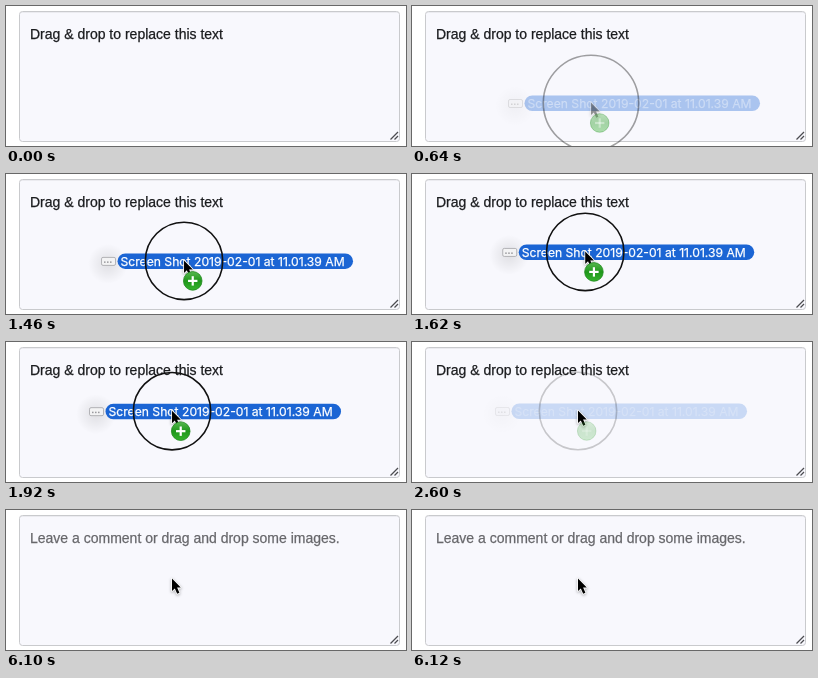
Recreate the animation shown at these times as an HTML page with a canvas. Size 400x140 px, loop 8 s.

```html
<!DOCTYPE html>
<html lang="en">
<head>
<meta charset="utf-8">
<title>Drag and drop</title>
<style>
html, body { margin: 0; width: 100%; height: 100%; overflow: hidden; background: #fff; }
canvas { display: block; width: 400px; height: 140px; }
</style>
</head>
<body>
<canvas id="stage"></canvas>
<script>
const LOOP = 8000, W = 400, H = 140;
const APPEAR = [500, 1220], MOVE = [1320, 1960], DROP = [2160, 2720], SWAP = 3310;
const START = [179, 97], END = [166, 69];

const canvas = document.getElementById('stage');
const ctx = canvas.getContext('2d');
const dpr = window.devicePixelRatio || 1;
canvas.width = W * dpr;
canvas.height = H * dpr;

const ramp = (t, a, b) => Math.min(1, Math.max(0, (t - a) / (b - a)));
const mix = (a, b, k) => a + (b - a) * k;
const easeOut = (u, power = 2) => 1 - (1 - u) ** power;
const smooth = u => u * u * u * (u * (6 * u - 15) + 10);

// The pointer first rises, then drifts left
function pointer(t) {
  const u = ramp(t, ...MOVE);
  return [mix(START[0], END[0], smooth(u)), mix(START[1], END[1], easeOut(u, 1.8))];
}

function box(x, y, w, h, r) {
  ctx.beginPath();
  ctx.roundRect(x, y, w, h, r);
}

function line(color, width, ...pts) {
  ctx.strokeStyle = color;
  ctx.lineWidth = width;
  ctx.beginPath();
  pts.forEach(([x, y], i) => i ? ctx.lineTo(x, y) : ctx.moveTo(x, y));
  ctx.stroke();
}

// A hairline outline gives the slightly heavy look of smoothed text
function label(text, x, y, font, color) {
  ctx.font = font;
  ctx.fillStyle = ctx.strokeStyle = color;
  ctx.lineWidth = 0.25;
  ctx.fillText(text, x, y);
  ctx.strokeText(text, x, y);
}

function withAlpha(alpha, paint) {
  if (alpha <= 0) return;
  ctx.save();
  ctx.globalAlpha = alpha;
  paint();
  ctx.restore();
}

function textarea(t) {
  box(13.5, 5.5, 380, 130, 3);
  ctx.fillStyle = '#f8f8fd';
  ctx.fill();
  line('#ebebf0', 1, [15, 6.5], [392, 6.5]);
  box(13.5, 5.5, 380, 130, 3);
  ctx.strokeStyle = '#c9cacd';
  ctx.stroke();
  line('#4c4c50', 1.2, [384.5, 133.5], [392, 126]);
  line('#4c4c50', 1.2, [388.5, 133.5], [392, 130]);
  const font = '14px "Liberation Sans", Arial, sans-serif';
  if (t < SWAP) label('Drag & drop to replace this text', 24, 33, font, '#1b1c1f');
  else label('Leave a comment or drag and drop some images.', 24, 33, font, '#67676b');
}

function file() {
  const glow = ctx.createRadialGradient(-76, 3, 2, -76, 3, 20);
  glow.addColorStop(0, 'rgba(0,0,0,.09)');
  glow.addColorStop(1, 'rgba(0,0,0,0)');
  ctx.fillStyle = glow;
  ctx.fillRect(-96, -17, 40, 40);
  box(-82.5, -3.5, 14, 8, 1.5);
  ctx.fillStyle = '#f3f3f4';
  ctx.fill();
  ctx.strokeStyle = '#b2b2b6';
  ctx.lineWidth = 1;
  ctx.stroke();
  ctx.fillStyle = '#98989c';
  for (let i = 0; i < 3; i++) ctx.fillRect(-80 + i * 3, 0.5, 1.5, 1.5);
  box(-66.5, -7.5, 235.5, 15.5, 7.75);
  ctx.fillStyle = '#1b65d4';
  ctx.fill();
  label('Screen Shot 2019-02-01 at 11.01.39 AM', -63.5, 5, '12.15px Inter, sans-serif', '#fff');
}

function ring(radius) {
  ctx.beginPath();
  ctx.arc(0, 0, radius, 0, 7);
  ctx.strokeStyle = '#111';
  ctx.lineWidth = 1.6;
  ctx.stroke();
}

function badge() {
  const x = 8.7, y = 20;
  const shade = ctx.createLinearGradient(0, y - 10, 0, y + 10);
  shade.addColorStop(0, '#5cba54');
  shade.addColorStop(0.5, '#1f971b');
  shade.addColorStop(1, '#37b52e');
  ctx.beginPath();
  ctx.arc(x, y, 9.3, 0, 7);
  ctx.fillStyle = shade;
  ctx.fill();
  ctx.strokeStyle = '#218a20';
  ctx.lineWidth = 0.8;
  ctx.stroke();
  line('#fff', 2.2, [x - 4.7, y], [x + 4.7, y]);
  line('#fff', 2.2, [x, y - 4.7], [x, y + 4.7]);
}

function arrow() {
  const shape = new Path2D('M0-.5V12L2.8 9.4L5.2 14.8L7.4 13.8L5.1 8.6H8.8Z');
  ctx.save();
  ctx.lineJoin = 'round';
  ctx.shadowColor = 'rgba(0,0,0,.35)';
  ctx.shadowBlur = 3 * dpr;
  ctx.shadowOffsetY = dpr;
  ctx.strokeStyle = '#fff';
  ctx.lineWidth = 1.6;
  ctx.stroke(shape);
  ctx.restore();
  ctx.fillStyle = '#000';
  ctx.fill(shape);
}

function draw(t) {
  ctx.setTransform(dpr, 0, 0, dpr, 0, 0);
  ctx.fillStyle = '#fff';
  ctx.fillRect(0, 0, W, H);
  textarea(t);
  if (t < APPEAR[0]) return;

  ctx.translate(...pointer(t));
  const gone = ramp(t, ...DROP);
  const press = ramp(t, APPEAR[0], 860);
  withAlpha(easeOut(ramp(t, ...APPEAR)) * (1 - gone), file);
  withAlpha(press * (1 - gone), () => ring(mix(63, 38.7, easeOut(press))));
  withAlpha(press, arrow);
  withAlpha(press * (1 - gone), badge);
}

function tick(now) {
  draw(now % LOOP);
  requestAnimationFrame(tick);
}
requestAnimationFrame(tick);
</script>
</body>
</html>
```
